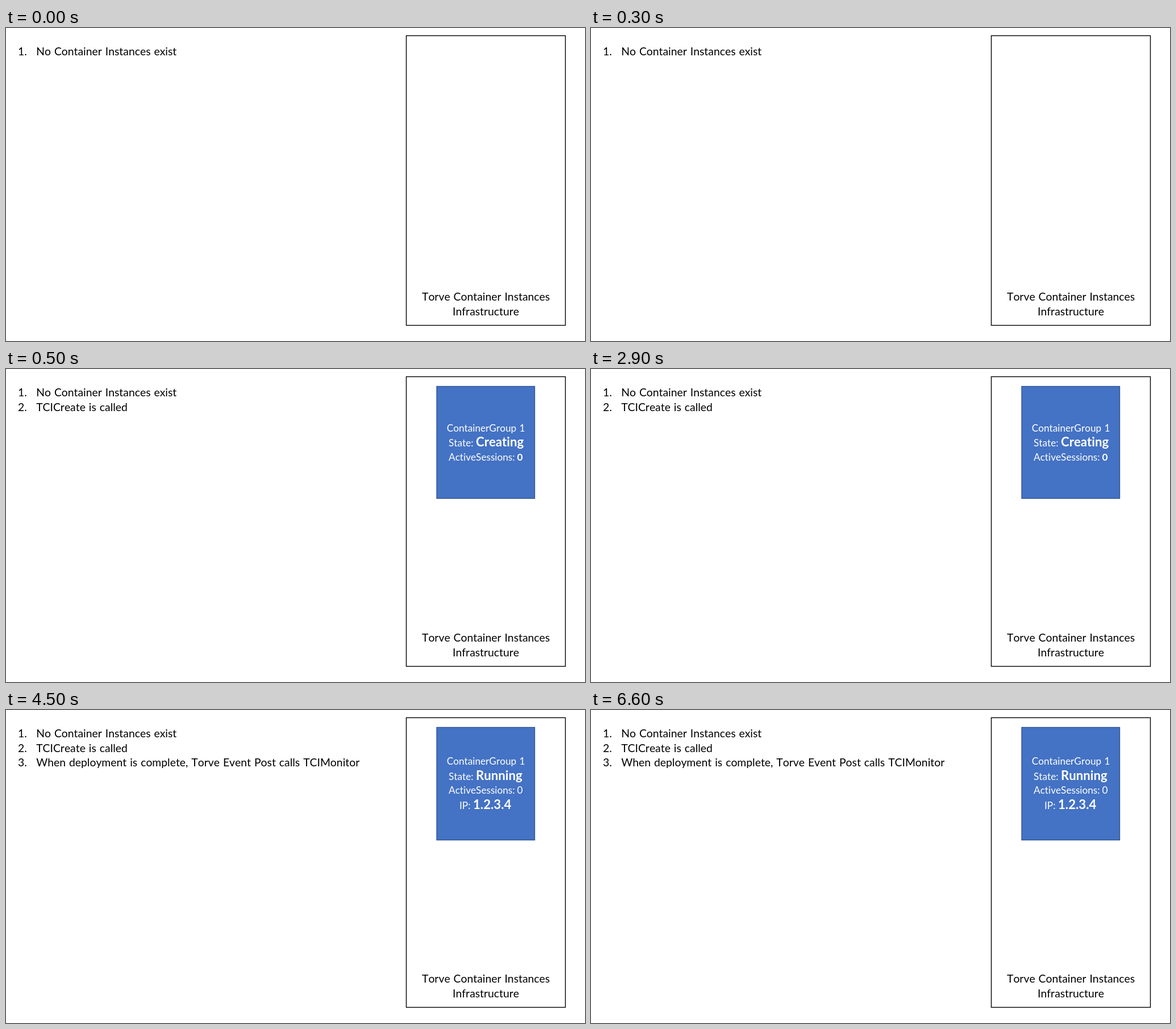
Write an HTML page that moves like this. It is 1019x550 px and loops after 8 s.

```html
<!DOCTYPE html>
<html lang="en">
<head>
<meta charset="utf-8">
<title>Container group lifecycle</title>
<style>
  html, body { margin: 0; width: 100%; height: 100%; overflow: hidden; background: #fff; }
  svg { display: block; width: 100vw; height: 100vh; }
  text {
    font-family: Lato, "Open Sans", sans-serif; font-size: 19.35px; word-spacing: 1px;
    font-kerning: none; font-variant-ligatures: none; white-space: pre;
  }
  .mid { text-anchor: middle; }
  .group text { fill: #fff; font-size: 17.2px; word-spacing: .9px; }
  .group .b { font-weight: 700; }
  .group .big { font-weight: 700; font-size: 22.2px; }
</style>
</head>
<body>
<svg id="stage" viewBox="0 0 1019 550" xmlns="http://www.w3.org/2000/svg"></svg>
<script>
const LOOP = 8000, CREATE = 500, RUN = 4500;
const stage = document.getElementById('stage');

function add(parent, tag, attrs, text) {
  const el = document.createElementNS('http://www.w3.org/2000/svg', tag);
  for (const k in attrs) el.setAttribute(k, attrs[k]);
  if (text) el.textContent = text;
  parent.appendChild(el);
  return el;
}

const label = (parent, x, y, text, cls = '') => add(parent, 'text', { x, y, class: cls }, text);

function step(n, text) {
  const g = add(stage, 'g', {});
  const y = 48.1 + (n - 1) * 25.5;
  label(g, 21, y, n + '.');
  label(g, 53.2, y, text);
  return g;
}

function group(height, top, state, drawRest) {
  const g = add(stage, 'g', { class: 'group' });
  add(g, 'rect', { x: 758, y: 30.5, width: 172.5, height, fill: '#4472c4', stroke: '#2f528f', 'stroke-width': 1.3 });
  label(g, 844.6, top, 'ContainerGroup 1', 'mid');
  label(g, 779, top + 26.7, 'State:');
  label(g, 827, top + 26.7, state, 'big');
  label(g, 779, top + 51, 'ActiveSessions:');
  drawRest(g, top);
  return g;
}

add(stage, 'rect', { x: 704.5, y: 13.5, width: 280, height: 509, fill: 'none', stroke: '#000', 'stroke-width': 1.4 });
label(stage, 844.6, 479.2, 'Torve Container Instances', 'mid');
label(stage, 844.6, 504.6, 'Infrastructure', 'mid');

step(1, 'No Container Instances exist');
const called = step(2, 'TCICreate is called');
const deployed = step(3, 'When deployment is complete, Torve Event Post calls TCIMonitor');

const creating = group(197, 109.6, 'Creating', (g, top) => {
  label(g, 899.4, top + 51, '0', 'b');
});
const running = group(198, 96.2, 'Running', (g, top) => {
  label(g, 899.4, top + 51, '0');
  label(g, 798, top + 77.6, 'IP:');
  label(g, 822, top + 77.6, '1.2.3.4', 'big');
});

const show = (el, on) => el.setAttribute('visibility', on ? 'visible' : 'hidden');

function draw(now) {
  const t = now % LOOP;
  show(called, t >= CREATE);
  show(creating, t >= CREATE && t < RUN);
  show(deployed, t >= RUN);
  show(running, t >= RUN);
}

function tick() {
  draw(performance.now());
  requestAnimationFrame(tick);
}
draw(0);
requestAnimationFrame(tick);
</script>
</body>
</html>
```
